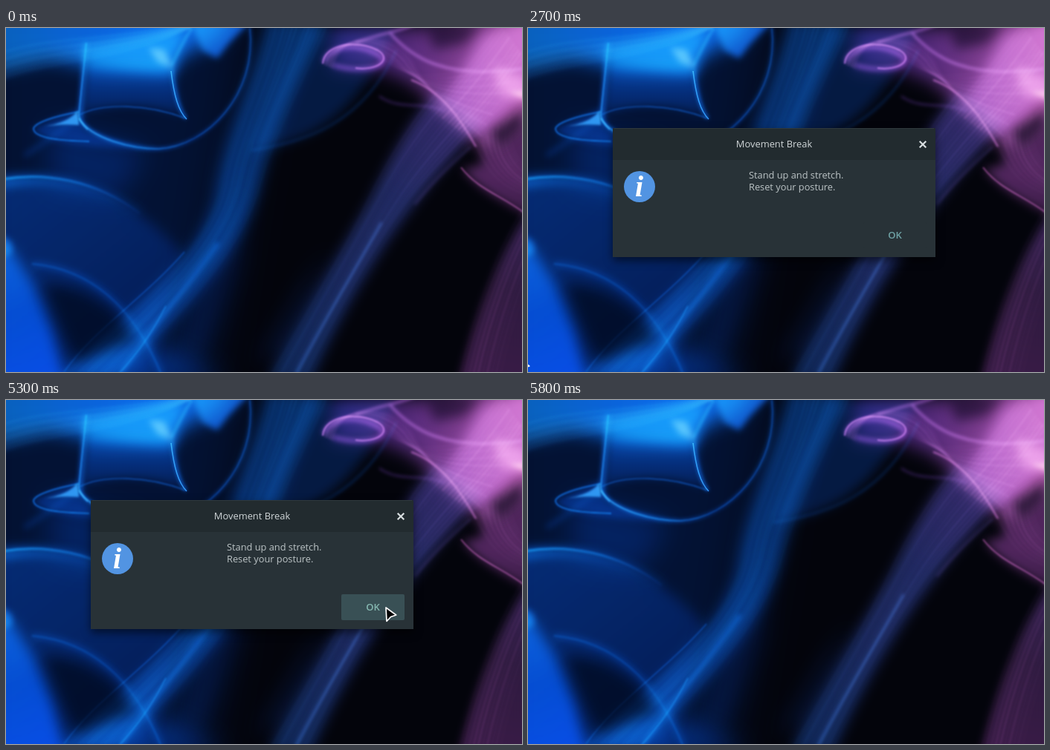
An HTML page with a canvas that plays this animation: 694 px wide and 464 px high, repeating every 8000 ms.

```html
<!DOCTYPE html>
<html lang="en">
<head>
<meta charset="utf-8">
<title>Movement Break</title>
<style>
html, body { margin: 0; width: 100%; height: 100%; overflow: hidden; background: #02040b; }
#stage { position: absolute; left: 0; top: 0; width: 694px; height: 464px; overflow: hidden; }
#stage > * { position: absolute; left: 0; top: 0; }
.dialog, .pointer, .button, .ok { animation: 8s step-end infinite; }
.dialog { transform-origin: 331px 222px; animation-name: dialog; }
.panel { filter: drop-shadow(0 5px 6px rgba(0, 0, 0, .55)); }
.button { fill: #283237; animation-name: button; }
.ok { fill: #6fa3a6; animation-name: ok; }
.pointer { animation-name: pointer; }
text { font-family: "Open Sans", "Noto Sans", sans-serif; font-size: 12.8px; fill: #bcc4c6; }
.title { font-weight: 500; font-size: 12.9px; fill: #d0d6d8; text-anchor: middle; }
.ok { font-weight: 600; font-size: 13px; text-anchor: middle; }
.info { font: italic bold 40px "Liberation Serif", serif; fill: #fff; text-anchor: middle; }

@keyframes dialog {
  0% { opacity: 0; transform: none; }
  6.25% { opacity: .98; transform: scale(.996); }
  7.5% { opacity: 1; transform: none; }
  67.5% { opacity: .76; transform: scale(.967); }
  68.75% { opacity: .35; transform: scale(.935); }
  70%, 100% { opacity: 0; transform: none; }
}
@keyframes button {
  0% { fill: #283237; }
  42.5% { fill: #2a383d; }
  43.75% { fill: #2d4045; }
  66.25% { fill: #395055; }
  67.5%, 100% { fill: #2d4045; }
}
@keyframes ok {
  0% { fill: #6fa3a6; }
  43.75%, 100% { fill: #86b8b1; }
}
@keyframes pointer {
  0% { transform: translate(-40px, 444px); }
  33.75% { transform: translate(-14px, 444px); }
  35% { transform: translate(9px, 437px); }
  36.25% { transform: translate(68px, 418px); }
  37.5% { transform: translate(151px, 392px); }
  38.75% { transform: translate(248px, 361px); }
  40% { transform: translate(344px, 330px); }
  41.25% { transform: translate(427px, 304px); }
  42.5% { transform: translate(487px, 285px); }
  43.75% { transform: translate(509px, 278px); }
  68.75% { transform: translate(400px, 214px); }
  70% { transform: translate(210px, 102px); }
  71.25% { transform: translate(36px, 0); }
  72.5%, 100% { transform: translate(-40px, 444px); }
}
</style>
</head>
<body>
<div id="stage">
  <canvas id="smoke" width="694" height="464"></canvas>
  <svg class="dialog" width="694" height="464">
    <g class="panel">
      <path fill="#283237" d="M114 137q0-2 2-2h430q2 0 2 2v172H114z"/>
      <path fill="#222b2f" d="M114 137q0-2 2-2h430q2 0 2 2v41H114z"/>
      <path fill="#2f393d" d="M116 135h430v1H116z"/>
    </g>
    <text class="title" x="331" y="161">Movement Break</text>
    <path d="M526.7 152.7l8.6 8.6m0-8.6l-8.6 8.6" stroke="#d8dee0" stroke-width="2.2"/>
    <circle cx="150" cy="214" r="21" fill="#5294e2"/>
    <text class="info" x="149.5" y="227">i</text>
    <text x="297" y="203">Stand up and stretch.</text>
    <text x="297" y="219">Reset your posture.</text>
    <rect class="button" x="451" y="262" width="85" height="35" rx="2"/>
    <text class="ok" x="493.5" y="284">OK</text>
  </svg>
  <svg class="pointer" width="20" height="24">
    <path d="M2 2L3 20.5 8.5 14.5 15.7 12z" stroke="#fff" stroke-width="1.7" stroke-linejoin="round"/>
  </svg>
</div>
<script>
const g = document.getElementById('smoke').getContext('2d');
let seed = 7;
const rand = () => (seed = seed * 16807 % 2147483647) / 2147483647;

function grad(x0, y0, x1, y1, ...colors) {
  const ramp = g.createLinearGradient(x0, y0, x1, y1);
  colors.forEach((c, i) => ramp.addColorStop(i / (colors.length - 1), c));
  return ramp;
}
function fill(blur, color, d) {
  g.filter = `blur(${blur}px)`;
  g.fillStyle = color;
  g.fill(new Path2D(d));
}
function line(blur, width, color, d) {
  g.filter = `blur(${blur}px)`;
  g.strokeStyle = color;
  g.lineWidth = width;
  g.stroke(new Path2D(d));
}
// Strands spread between two Bezier chains.
function wisp(count, width, alpha, color, a, b) {
  g.filter = 'blur(1.6px)';
  g.strokeStyle = color;
  g.lineWidth = width;
  for (let i = 0; i < count; i++) {
    const t = i / (count - 1);
    const p = a.map((v, k) => v + (b[k] - v) * t);
    g.globalAlpha = alpha * (.25 + .75 * rand()) * (.35 + .65 * Math.sin(Math.PI * t));
    g.beginPath();
    g.moveTo(p[0], p[1]);
    for (let k = 2; k < p.length; k += 6) g.bezierCurveTo(...p.slice(k, k + 6));
    g.stroke();
  }
  g.globalAlpha = 1;
}

g.fillStyle = '#03040b';
g.fillRect(0, 0, 694, 464);
g.globalCompositeOperation = 'screen';

// Blue haze on the left
fill(40, '#000e2b', 'M-60-60H340L300 200 250 520H-60z');
fill(18, '#011138', 'M60 130L190 165 150 230 60 215z');
fill(9, grad(0, 200, 160, 400, '#021c52', '#010d30'), 'M-30 204C60 190 160 215 238 305L200 400 190 490H-30z');
line(6, 14, grad(0, 0, 230, 0, '#04388a', '#02174a00'), 'M-10 210C60 198 120 212 180 250');
line(1.5, 3, grad(0, 0, 200, 0, '#0d6ad0', '#063a8a', '#02174a00'), 'M-5 204C50 194 120 204 180 250');

// Bright blue plume at the top left
fill(13, grad(0, 0, 330, 0, '#0656ae', '#0758d0', '#0a62ea', '#0640a0'), 'M-40-40H325L285 18 238 35 215 58 130 56 60 40-40 58z');
fill(8, '#0a52c8', 'M100 28L240 0 226 62 165 56 110 48z');
wisp(14, 2.5, .3, '#2a86ff', [-5, 30, 50, 10, 120, 15, 245, -5], [-5, 72, 60, 45, 150, 50, 250, 0]);
fill(4, '#5a8ceccc', 'M192 27L213 29 224 54 204 46z');
fill(4, '#0c4cc0', 'M248-8H328L300 20 284 41 264 30z');
line(2, 2.5, '#1468e0', 'M222 52C232 32 240 15 250 0');

// Hanging tube and loop
fill(6, grad(0, 40, 0, 115, '#04379a', '#010f30'), 'M108 45H222L236 118C190 100 140 102 102 116z');
line(3, 5, '#0a46b8', 'M108 20C104 60 102 100 99 122');
line(.8, 1.7, grad(0, 20, 0, 130, '#0a58d8', '#1c6ae0'), 'M108 20C104 60 100 95 98 118Q100 128 110 137');
line(2.5, 4, '#0a48b4', 'M223 55C226 90 234 112 242 122');
line(.7, 1.6, '#2a78e8', 'M222 58C226 92 232 112 243 123');
line(1, 1.4, '#0a3c92', 'M99 117C130 101 190 102 242 122');
fill(5, '#021a55', 'M37 136C60 125 85 115 100 108L106 136Q160 160 205 163C140 163 45 156 37 136z');
fill(1.5, '#2a7ae0', 'M50 133C75 129 88 122 96 112L98 131C80 129 65 131 50 133z');
line(1, 2, '#0b52bc', 'M98 113C65 119 38 128 37 136C38 150 80 152 112 153');
line(2.5, 4, grad(100, 0, 330, 0, '#0a4cc0', '#063c98', '#02184a', '#031f50'), 'M98 122C115 150 170 163 205 163C270 160 338 90 328 0');
line(.8, 1.6, grad(100, 0, 330, 0, '#2878e8', '#1560c8', '#052868', '#052c70'), 'M98 122C115 150 170 163 205 163C270 160 338 90 328 0');
line(4, 5, '#021844', 'M25 172C60 150 85 130 100 118');

// Bright body at the bottom left
fill(9, grad(0, 290, 60, 464, '#0848c4', '#0030b4', '#0436d6'), 'M-30 285L8 300 36 345 62 410 84 490H-30z');
fill(4, '#0c50c8', 'M-10 280Q12 284 8 304L-10 312z');
line(5, 8, '#02194c', 'M35 318C110 325 170 370 210 470');
line(1.5, 2, '#032463', 'M35 318C110 325 170 370 210 470');
fill(18, '#02236e', 'M80 470C130 420 230 420 290 480z');

// Central column
fill(9, grad(400, 0, 120, 464, '#03275a', '#032458', '#03265f', '#04286a', '#042a78'),
  'M352-10H432C385 80 362 140 345 200C325 290 270 350 150 475H70C180 370 255 320 280 230C290 150 330 70 352-10z');
wisp(15, 2.6, .3, grad(400, 0, 150, 464, '#0c4688', '#083a80', '#0a48a0', '#1054c4'),
  [352, -5, 340, 70, 295, 150, 288, 215, 268, 300, 180, 370, 75, 464],
  [432, -5, 400, 70, 362, 140, 342, 210, 318, 300, 240, 380, 155, 464]);
line(3, 5, '#06308a', 'M285 290C250 340 210 385 155 464');
line(1, 1.4, '#0a44a6', 'M215 375Q190 425 152 466');
line(1, 1.2, '#06348c', 'M240 302C185 365 120 405 78 464');
fill(16, '#010d2c', 'M320 200L310 320 265 440 235 440 285 290z');
fill(8, '#02163a', 'M405 0H525C480 90 440 150 330 165L370 70z');
line(2, 2, '#04204c', 'M330 165C400 155 480 130 525 30');

// Violet column
fill(8, grad(600, 110, 380, 464, '#2b235c', '#18204f', '#111d48', '#0a1c44'),
  'M578 85L640 130C585 190 555 230 520 280C480 340 445 400 412 475H352C400 380 450 300 490 230C515 180 540 130 578 85z');
wisp(15, 2.6, .33, grad(600, 110, 380, 464, '#6844a0', '#343a80', '#283c80', '#1e488c'),
  [582, 85, 545, 125, 510, 185, 488, 230, 450, 310, 400, 390, 358, 466],
  [650, 125, 600, 180, 570, 205, 542, 242, 490, 310, 445, 400, 412, 466]);
line(2, 3, '#1a3472', 'M505 262C470 325 430 390 390 466');
line(2, 2, '#2c2350', 'M625 160Q575 205 550 238');
fill(14, '#030f2c', 'M440 300L370 440 340 450 400 350z');

// Pink plume
fill(12, grad(450, 30, 694, 60, '#2a1258', '#4c2470', '#7c3a8a', '#99458f'),
  'M440 0H600L650-20H720V105L640 158 590 112 545 72 500 55 440 55z');
fill(9, grad(694, 0, 590, 120, '#8c4292', '#7c3c90', '#4c2a74'), 'M640 10L720-20V70L640 145 585 105z');
wisp(14, 2.6, .34, '#d070cc', [665, -5, 640, 30, 610, 70, 570, 110], [705, 50, 680, 90, 650, 125, 625, 150]);
wisp(10, 2, .34, '#a858c8',
  [425, 48, 430, 15, 480, 25, 515, 48, 550, 72, 600, 70, 700, 30],
  [440, 55, 450, 0, 520, 5, 545, 42, 570, 95, 610, 120, 632, 160]);
line(3, 6, '#5c2a90', 'M428 46C432 24 475 20 500 36S475 62 440 50');
line(1.2, 2, '#9550bc', 'M426 48C428 22 470 15 500 30C520 42 500 58 470 54');
line(2, 3, '#79409c', 'M470 20C510 5 530 5 550-5M515 5C545 40 590 70 694 55');
line(1.5, 2, '#9a4c9c', 'M545 70C585 85 610 120 632 160');
line(2, 2, '#3c2060', 'M502 92C530 112 560 98 590 112');
fill(7, '#a0508c', 'M655 50L710 75V102L665 90z');
fill(3, '#c87070', 'M676 86L700 84V97z');

// Lower pink veil and column
fill(7, grad(630, 150, 690, 240, '#4a2350', '#4e2256', '#421c48'), 'M636 150L720 95V262C680 240 640 222 614 190L640 185z');
wisp(9, 2, .3, '#a050a0', [632, 158, 650, 200, 670, 215, 700, 225], [694, 105, 660, 140, 690, 180, 700, 190]);
line(1.2, 2, '#78386f', 'M612 188C635 218 665 225 698 250');
fill(6, grad(690, 240, 650, 464, '#2c1a48', '#2c1636', '#36173e'), 'M720 225C680 275 640 350 608 480H720z');
wisp(10, 2.4, .3, '#70386c', [698, 240, 665, 290, 630, 380, 611, 466], [720, 290, 700, 340, 680, 400, 665, 466]);

// Dark pockets
g.globalCompositeOperation = 'source-over';
fill(9, '#010716aa', 'M50 345C100 345 150 375 172 420L95 452Q70 400 50 345z');
fill(8, '#12092499', 'M568 0L640-5 615 22 575 30z');
fill(7, '#0a0618aa', 'M650 140L694 112V132L665 160z');
</script>
</body>
</html>
```
